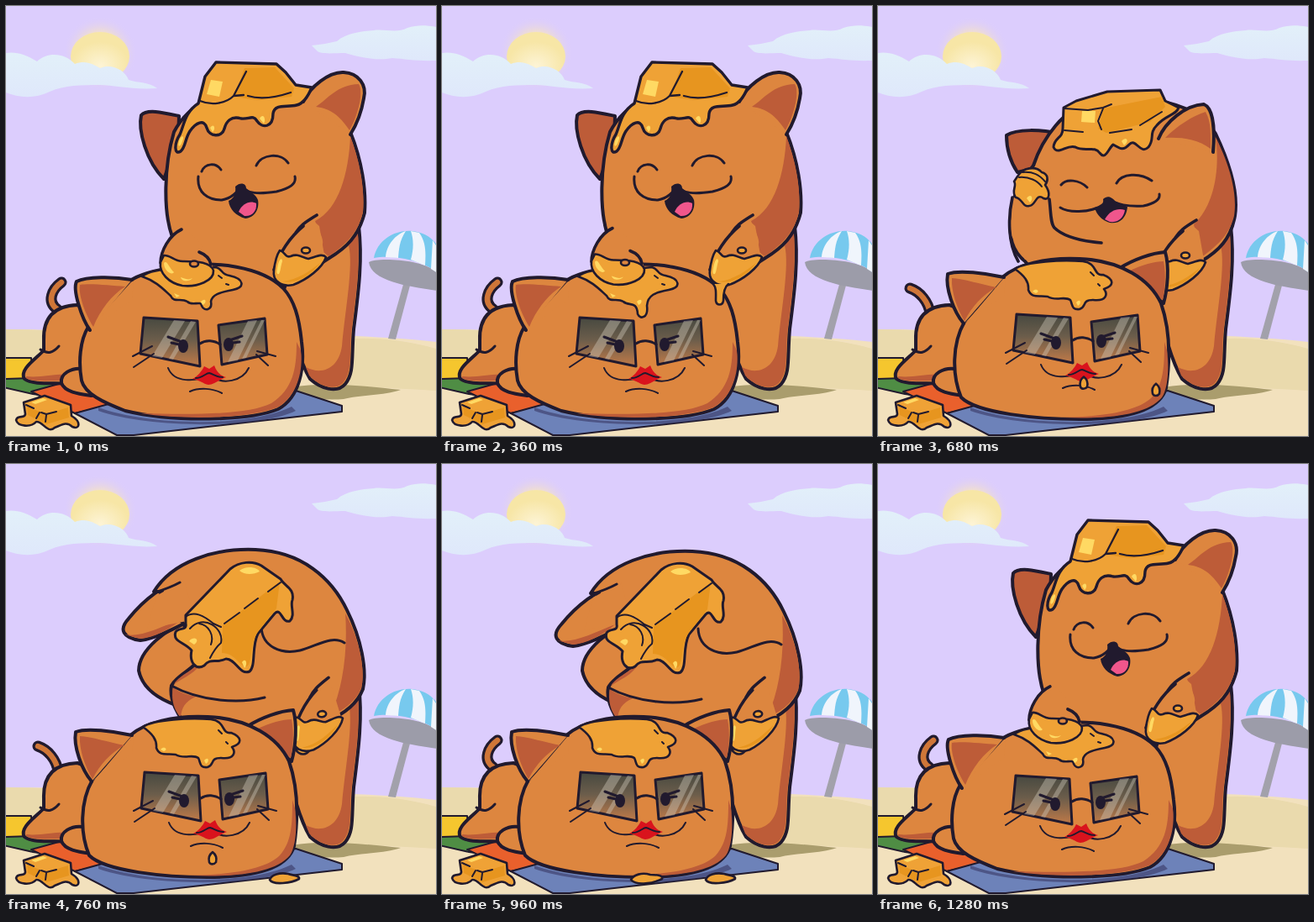
Write an HTML page that moves like this. It is 512 px wide and 512 px high and loops after 1.36 s.

```html
<!DOCTYPE html>
<html lang="en">
<head>
<meta charset="utf-8">
<title>Butter massage on the beach</title>
<style>
html, body { margin: 0; width: 100%; height: 100%; overflow: hidden }
svg { display: block; width: 100%; height: 100% }
path, ellipse { stroke-linejoin: round; stroke-linecap: round }
.fur { fill: #dd863f; stroke: #211a2e; stroke-width: 4 }
.patch { fill: #dd863f }
.shade { fill: #bd5c38 }
.ear { fill: #bd5c38; stroke: #211a2e; stroke-width: 4 }
.line { fill: none; stroke: #211a2e; stroke-width: 3 }
.thin { fill: none; stroke: #211a2e; stroke-width: 2 }
.butter { fill: #efa236; stroke: #211a2e; stroke-width: 2.6 }
.deep { fill: #e7951f }
.shine { fill: #ffd963 }
.dark { fill: #211a2e }
</style>
</head>
<body>
<svg viewBox="0 0 512 512">
  <defs>
    <radialGradient id="glow">
      <stop offset=".5" stop-color="#f6e3c4"/><stop offset="1" stop-color="#dccdfd" stop-opacity="0"/>
    </radialGradient>
    <radialGradient id="sun" cy=".7">
      <stop offset="0" stop-color="#fdf4d6"/><stop offset="1" stop-color="#f7e6a6"/>
    </radialGradient>
    <linearGradient id="lens" x2="0" y2="1">
      <stop offset="0" stop-color="#474940"/><stop offset=".45" stop-color="#6b5d4b"/><stop offset="1" stop-color="#c07a48"/>
    </linearGradient>
    <linearGradient id="cloud" x2="0" y2="1">
      <stop offset="0" stop-color="#e2f0f9"/><stop offset="1" stop-color="#dfe8fb"/>
    </linearGradient>
    <g id="hand">
      <path class="patch" d="M364 254C342 267 325 290 319 315L345 332L380 302L373 262Z"/>
      <path class="line" d="M370 249C355 258 350 262 345 270M354 262C338 275 325 295 319 314" style="stroke-width:3.6"/>
      <path class="butter" d="M326 291C333 293 332 300 339 298C348 294 353 300 360 301C368 299 377 294 381 299C377 312 358 326 342 332C328 335 317 327 319 315C320 306 322 297 326 291Z"/>
      <path class="shine" d="M323 312C325 300 329 299 329 304C327 310 327 316 325 319C322 320 322 316 323 312Z"/>
      <path class="deep" d="M329 328C348 326 362 315 374 306C364 320 345 332 329 328Z"/>
      <ellipse class="butter" cx="357" cy="291" rx="5" ry="3.5"/>
    </g>
  </defs>

  <rect width="512" height="512" fill="#dccdfd"/>
  <circle cx="112" cy="56" r="44" fill="url(#glow)"/>
  <ellipse cx="112" cy="60" rx="35" ry="29" fill="url(#sun)"/>
  <path fill="url(#cloud)" d="M0 56C12 54 24 58 37 66C50 54 70 56 82 69C96 64 104 70 112 74C125 68 142 76 146 88C158 92 170 90 180 98C150 100 128 94 112 94C90 94 70 94 52 102C34 111 14 109 0 103Z"/>
  <path fill="url(#cloud)" d="M364 47C376 46 384 44 394 42C405 32 424 30 438 29C450 27 466 33 478 26C490 22 502 23 512 25V65C490 66 476 63 460 62C440 66 418 60 404 56C390 56 374 58 370 53Z"/>

  <path fill="#f2e1bd" d="M0 385C40 386 380 385 512 400V512H0Z"/>
  <path fill="#eadaad" d="M0 385C40 385 70 388 100 390V420H0ZM380 400C420 392 470 396 512 408V458C470 456 420 452 380 453Z"/>
  <path fill="#a2a1ab" d="M474 328L482 329L464 397L455 396Z"/>
  <path fill="#9c9ca9" d="M432 305C440 299 500 301 513 318V339C480 334 435 328 432 305Z"/>
  <path fill="#77c9ee" d="M438 300C442 278 464 266 484 268C500 270 510 278 514 287V318C495 302 460 296 438 300Z"/>
  <path fill="#f0f5fc" d="M452 299C453 284 464 272 476 268C468 280 468 290 467 300ZM482 302C486 288 485 276 482 268L492 270C500 281 500 293 499 309ZM506 313L508 279L514 288V318Z"/>
  <path fill="#aa9d6d" d="M340 454C380 447 430 453 470 457C450 464 420 463 402 468C380 470 350 466 340 462Z"/>

  <g stroke="#211a2e" stroke-width="2">
    <path fill="#f5c62e" d="M-3 419L30 419L32 446L-3 444Z"/>
    <path fill="#4f8d44" d="M-3 444L62 442L48 464L32 462L-3 454Z"/>
    <path fill="#e9602c" d="M30 459L70 448L125 475L82 485Z"/>
    <path fill="#6d82b9" d="M82 485L122 474L345 458L400 476L400 483L152 511L132 511Z"/>
  </g>
  <path fill="#3d3e6c" opacity=".65" d="M110 478C170 500 290 502 340 477L345 482C300 504 170 503 110 482Z"/>

  <g id="tail" fill="none">
    <path stroke="#211a2e" stroke-width="13"/>
    <path stroke="#cf7638" stroke-width="6.5"/>
  </g>
  <path class="fur" d="M45 398C44 370 58 357 85 356L102 362L105 452L80 450C60 448 32 452 22 444C15 433 36 420 45 410Z"/>
  <path class="shade" d="M24 441C42 443 60 437 76 439L70 446C54 446 32 448 24 443Z"/>
  <path class="line" d="M41 409C50 415 56 413 63 405"/>
  <path class="fur" d="M92 432C78 430 64 438 66 449C70 460 88 462 102 464"/>

  <g>
    <path class="butter" d="M21 472L46 464L77 475L78 488C90 495 88 505 79 501C72 494 66 499 58 502C49 510 44 494 36 495C30 502 14 501 12 493C14 486 22 492 23 486Z"/>
    <path class="deep" d="M25 477L48 486L74 478L75 490L48 498L26 487Z"/>
    <path class="thin" d="M24 475L33 479M42 484L48 486L60 483M36 491L40 484M48 487L47 495"/>
    <path class="shine" d="M30 472L44 467L49 469L35 474Z"/>
  </g>

  <path class="fur" d="M344 300L420 262C425 305 419 345 414 385C411 420 415 436 404 450C394 462 374 455 362 444C350 424 340 390 330 340Z"/>
  <path class="shade" d="M419 270C422 310 416 350 411 390C409 420 412 436 401 449C390 459 372 452 361 440L357 430C376 440 396 432 400 405C404 360 414 310 408 285Z"/>

  <!-- laughing, both paws on the friend -->
  <g id="laugh">
    <path class="ear" d="M206 131C188 127 168 122 161 130C157 148 167 185 188 206L205 160Z"/>
    <path class="fur" d="M200 150C220 112 260 98 300 96C352 94 392 112 410 150C424 185 429 220 427 246C420 274 405 288 385 300L335 332L230 332L198 275C187 245 188 190 200 150Z"/>
    <path class="shade" d="M410 155C423 190 427 220 425 245C420 268 406 284 384 298L372 288C384 284 372 268 368 256C396 242 408 200 410 155Z"/>
    <path class="fur" d="M354 114C362 96 385 78 402 79C420 80 430 94 426 110C423 128 417 142 410 153"/>
    <path class="shade" d="M369 120C384 110 394 94 420 93C427 104 417 135 409 148C397 130 386 122 369 120Z"/>
    <path class="butter" style="stroke-width:3.4" d="M229 116L237 84L250 67L322 69L333 79L345 94L364 97C360 107 355 116 346 118C334 121 320 116 318 128C318 145 305 146 299 137C294 129 290 135 280 134C268 130 262 138 260 146C257 157 242 156 239 145C236 134 226 139 219 149C213 158 214 168 208 173C200 178 200 164 207 153C212 142 213 126 229 116Z"/>
    <path class="deep" d="M272 108L284 74L320 73L343 98L340 108L300 112Z"/>
    <path class="line" d="M231 113C245 119 262 116 271 107L283 106M271 107L286 78M288 107C304 112 324 108 339 103" style="stroke-width:2.3"/>
    <path class="shine" d="M244 88L258 90L254 108L239 105Z"/>
    <path class="shine" d="M206 161C209 153 213 154 210 161C208 168 204 169 206 161ZM243 145C248 138 250 147 246 150ZM302 134C306 127 310 134 307 140Z"/>
    <path class="line" d="M233 197C237 187 250 186 256 195M298 190C304 176 328 174 336 187M229 203C227 222 240 231 257 231C268 229 276 222 279 214C286 224 302 224 322 221C338 217 346 212 344 203"/>
    <path class="dark" d="M273 215C279 209 286 211 286 217C292 222 298 225 300 231C302 242 296 252 285 253C274 250 266 242 265 232C272 229 274 222 273 215Z"/>
    <path fill="#f0568c" d="M277 245C281 235 291 231 298 235C299 245 292 251 284 250Z"/>
    <use href="#hand"/>
  </g>

  <!-- bending over, back of the head showing -->
  <g id="bend">
    <path id="bendArm" class="fur" d="M225 184C190 195 158 222 158 246C162 266 180 279 202 287L250 260Z"/>
    <g id="bendEar">
      <path class="fur" d="M214 138C190 140 163 163 146 184C134 197 139 207 160 210C180 207 200 196 220 186Z"/>
      <path class="shade" d="M141 203C160 207 185 194 210 184C196 197 175 207 160 208Z"/>
    </g>
    <g id="back">
      <path class="fur" d="M176 152C198 116 248 100 297 102C352 104 388 136 406 174C423 208 430 245 425 268C418 286 402 298 382 306L340 332L222 322C203 298 194 280 197 264C204 250 225 244 232 230L210 188C192 176 176 166 186 152Z"/>
      <path class="shade" d="M404 178C422 210 428 248 423 267C416 284 400 294 386 300C402 265 407 220 404 178ZM199 266C206 272 216 275 226 277C213 283 209 290 208 302C200 293 196 280 199 266ZM200 262C206 252 222 246 232 236C228 248 212 254 200 262Z"/>
      <path class="patch" d="M179 157L212 138L225 185L200 190L168 196Z"/>
      <path class="line" d="M177 153C190 149 198 146 207 141M197 264C230 282 276 286 308 278M304 194C305 218 328 227 350 222C370 217 388 203 403 213"/>
    </g>
    <g id="slab">
      <path class="butter" style="stroke-width:3" d="M214 180L267 125C278 116 294 115 304 121L327 137C332 146 344 148 341 162C338 169 345 180 338 187C328 190 328 170 320 178L300 202C292 218 298 240 290 247C278 252 274 232 262 232C250 238 244 230 236 240C226 246 218 236 221 222C213 212 198 212 202 200C206 194 216 199 214 190Z"/>
      <path class="deep" d="M258 192L326 140L322 172L300 200C290 214 294 236 287 241C277 242 274 225 257 225Z"/>
      <path class="thin" d="M214 182C224 174 236 181 247 190L256 194M260 190L278 177M284 172L300 160M312 152L327 141M219 196C235 178 260 195 256 213C250 218 246 225 243 231M230 190C242 192 248 204 244 215"/>
      <path class="shine" d="M278 127C286 120 300 123 302 128C294 132 284 132 278 127ZM218 211C224 204 232 209 224 215ZM281 236C286 230 288 238 284 243Z"/>
    </g>
    <path class="butter" d="M344 339C350 348 358 347 362 340Z"/>
    <use href="#hand" transform="translate(23 11) rotate(-7 320 320)"/>
  </g>

  <!-- rising, one paw taking butter from the head -->
  <g id="reach">
    <path class="ear" d="M216 152C195 147 165 146 153 154C153 172 158 186 166 198L200 190Z"/>
    <path class="fur" d="M185 190C195 160 220 120 260 112C320 104 380 115 402 152C420 190 429 225 425 250C420 278 405 292 385 304L335 332L190 322L175 304C160 292 155 275 158 250C160 225 170 208 185 190Z"/>
    <path class="shade" d="M402 156C424 200 427 230 424 250C418 275 400 288 384 300L376 260C398 240 408 200 402 156Z"/>
    <path class="fur" d="M334 158C342 138 366 118 388 117C400 122 401 150 399 174"/>
    <path class="shade" d="M342 157C356 143 374 131 390 126C397 138 396 155 396 170C380 158 360 156 342 157Z"/>
    <path class="butter" style="stroke-width:3" d="M221 121L236 113L273 102L336 100L342 113L358 121C355 130 342 130 332 142C322 152 330 158 322 168C312 178 307 156 299 165C291 174 286 168 280 165C274 170 271 184 264 175C258 166 246 174 235 168C225 164 214 179 209 168C210 156 220 158 220 146Z"/>
    <path class="deep" d="M268 122L338 108L342 120L324 138L272 151L262 146Z"/>
    <path class="thin" d="M222 122L250 124L268 121L278 117M268 122L262 137L266 147M276 151L302 147M312 142L338 126M222 148L244 150"/>
    <path class="shine" d="M243 125L259 125L258 139L242 138ZM290 161C296 154 300 161 293 166Z"/>
    <path class="line" d="M218 213C224 205 240 207 249 216M284 211C290 199 312 198 326 208M217 240C228 247 250 245 262 240C268 237 272 234 275 229C282 237 300 239 316 238C330 235 336 230 335 224"/>
    <path class="dark" d="M268 230C274 224 280 229 283 233L297 239C296 252 288 260 276 258C266 255 260 248 258 240C266 238 269 235 268 230Z"/>
    <path fill="#f0568c" d="M270 254C276 243 286 240 294 243C292 254 284 258 276 257Z"/>
    <path class="patch" d="M160 228L204 228L207 262L240 290L175 302L157 270Z"/>
    <path class="line" style="stroke-width:3.6" d="M160 228C155 250 154 282 167 304M204 230C206 245 205 258 210 264C222 276 244 280 266 282"/>
    <path class="butter" d="M166 203C172 192 188 190 195 198C203 200 203 208 199 213C206 223 204 232 197 229C188 222 188 238 180 238C172 240 172 229 164 228C158 220 166 214 162 209Z"/>
    <path class="thin" d="M168 204C180 203 190 208 195 215M172 198C185 197 192 201 199 209"/>
    <path class="shine" d="M177 229C182 222 186 229 181 234Z"/>
    <use href="#hand" x="9" y="6"/>
  </g>

  <!-- the friend's head -->
  <g id="headPressed">
    <path class="fur" d="M98 382C88 398 86 424 90 446C94 462 116 472 142 482C200 496 290 494 324 480C350 466 356 430 352 400C349 370 343 350 330 336C305 311 250 302 200 311C176 315 158 320 148 327Z"/>
    <path class="shade" d="M351 410C354 432 348 464 323 478C292 490 220 494 160 485C230 487 290 486 316 473C342 456 346 432 346 400Z"/>
    <path class="fur" d="M150 326C128 322 96 322 84 328C79 338 90 372 100 386"/>
    <path class="patch" d="M102 384L152 328L150 350Z"/>
    <path class="shade" d="M88 332C102 330 124 333 142 334C126 344 112 362 104 382C95 368 86 345 88 332Z"/>
  </g>
  <g id="headFree">
    <path class="fur" d="M288 312C304 302 326 294 342 293C347 310 345 336 340 354Z"/>
    <path class="shade" d="M298 316C314 308 330 304 340 304C343 320 342 336 339 350Z"/>
    <path class="fur" d="M103 376C88 402 88 440 99 466C118 485 190 492 240 492C300 492 336 480 343 455C349 415 346 380 337 354C324 326 290 303 240 301C200 299 165 308 148 323Z"/>
    <path class="shade" d="M344 410C347 432 345 456 338 466C320 488 270 492 220 490C270 489 310 482 326 466C340 450 341 430 341 400Z"/>
    <path class="fur" d="M150 323C128 318 96 314 83 319C80 336 90 364 102 378"/>
    <path class="patch" d="M104 377L152 325L150 345Z"/>
    <path class="shade" d="M88 324C102 325 122 331 141 335C124 344 112 358 103 375C94 360 87 340 88 324Z"/>
    <path class="butter" d="M163 313C174 321 180 328 179 338C183 349 192 344 202 346C212 352 222 345 229 350C232 356 230 362 240 361C249 358 242 350 256 350C272 352 274 343 269 337C282 333 281 325 268 320C256 322 262 306 244 304C220 302 176 304 163 313Z"/>
    <path class="thin" d="M253 317L257 321M262 331L264 333"/>
    <path class="shine" d="M236 353C241 347 243 354 238 357ZM184 340C188 335 194 340 188 342Z"/>
  </g>
  <g id="face">
    <path fill="url(#lens)" stroke="#211a2e" stroke-width="3" d="M164 371L228 375L231 429L160 414ZM253 380L308 372L311 415L257 427Z"/>
    <path fill="#d3cbbb" opacity=".4" d="M200 374L213 375L186 419L174 417ZM220 375L226 376L199 421L194 420ZM288 375L299 374L276 422L264 424ZM304 374L308 374L286 419L281 420Z"/>
    <path class="thin" d="M231 402C238 397 248 398 255 403" style="stroke-width:3"/>
    <ellipse class="dark" cx="211" cy="405" rx="6" ry="8"/>
    <ellipse class="dark" cx="265" cy="403" rx="6" ry="8"/>
    <path class="line" d="M193 394L209 400M197 401L206 403M266 398L281 393M270 401L278 400"/>
    <path class="thin" d="M152 430L176 414M151 417L174 405M299 411L321 417M298 415L312 428M193 431C200 449 226 448 242 439C258 453 282 446 289 431"/>
    <path fill="#d9131d" d="M222 444C228 441 233 435 236 429L242 432L248 428C251 436 255 440 262 442C254 445 247 451 241 451C235 450 230 445 222 444Z"/>
    <path class="thin" d="M226 443C234 443 238 437 242 437C247 438 250 442 258 442M219 459C230 454 246 455 257 461"/>
  </g>

  <!-- butter under the rubbing paw -->
  <g id="rub">
    <path id="blob" class="butter"/>
    <path class="thin" d="M253 321L257 324M262 331L265 332"/>
    <path class="shine" d="M232 352C238 346 240 353 234 356ZM200 342L207 345L203 347Z"/>
    <g id="paw">
      <path class="patch" d="M198 273C188 283 184 296 184 310C190 330 218 338 236 328C248 322 250 310 240 300C236 286 222 268 208 264"/>
      <path class="line" d="M209 266C194 273 184 292 184 306M230 293C238 296 243 302 244 308" style="stroke-width:3.6"/>
      <path class="butter" d="M188 297C196 296 200 305 212 304C228 304 244 305 247 315C248 327 228 335 210 333C194 330 182 318 184 305Z"/>
      <path class="shine" d="M188 306C192 302 194 312 200 317C198 321 188 316 188 306ZM208 323C216 326 218 326 222 324C218 329 209 328 208 323Z"/>
      <ellipse class="butter" cx="224" cy="307" rx="5" ry="3.5" style="fill:#dd863f"/>
    </g>
    <path id="drip" class="butter"/>
  </g>

  <g id="drops">
    <path class="butter" d="M0 -7C4 -4 5 1 4 5C2 8 -3 8 -4 5C-5 1 -4 -4 0 -7Z"/>
    <path class="butter" d="M0 -7C4 -4 5 1 4 5C2 8 -3 8 -4 5C-5 1 -4 -4 0 -7Z"/>
  </g>
  <g id="puddles">
    <path class="butter" d="M225 495C228 489 238 486 248 489C256 489 264 490 262 494C252 499 232 503 225 495Z"/>
    <path class="butter" d="M314 495C316 489 326 486 336 488C342 490 350 490 349 494C340 499 318 502 314 495Z"/>
  </g>
</svg>
<script>
const LOOP = 1360, SWING = LOOP / 3;
const byId = id => document.getElementById(id);
const show = (el, on) => el.style.display = on ? '' : 'none';
const move = (el, x, y) => el.setAttribute('transform', `translate(${x} ${y})`);
const clamp = (v, lo = 0, hi = 1) => Math.min(hi, Math.max(lo, v));
const [leftDrop, rightDrop] = byId('drops').children;
const [leftPuddle, rightPuddle] = byId('puddles').children;

function drawPose(t) {
  const laughing = t < 640 || t >= 1200;
  const bending = t >= 700 && t < 1060;
  show(byId('laugh'), laughing);
  show(byId('rub'), laughing);
  show(byId('headPressed'), laughing);
  show(byId('headFree'), !laughing);
  show(byId('bend'), bending);
  show(byId('reach'), !laughing && !bending);
  move(byId('face'), laughing ? 0 : 1, laughing ? 0 : -4);
  const scoop = clamp((t - 760) / 200);
  move(byId('back'), scoop, 2 * scoop);
  move(byId('slab'), -6 * scoop, scoop);
  move(byId('bendEar'), -4 * scoop, 7 * scoop);
  move(byId('bendArm'), 9 * scoop, 0);
}

function drawTail(t) {
  const curled = (t + 100) % SWING < SWING / 2;
  const d = curled ? 'M61 361C48 352 55 337 66 329' : 'M62 366C60 352 50 340 38 336';
  for (const path of byId('tail').children) path.setAttribute('d', d);
}

function drawRub(t) {
  const side = clamp(.5 - 1.3 * Math.cos((t - 35) / SWING * 2 * Math.PI));
  move(byId('paw'), -8 * side, -2 * side);
  const sag = t < 640 ? 14 * clamp(t / 520) : 0;
  byId('blob').setAttribute('d', `M162 322C174 313 196 312 220 314L250 311C258 313 256 320 266 321C284 325 285 335 270 338C254 341 245 344 244 ${352 + sag / 2}C246 ${362 + sag} 236 ${364 + sag} 233 ${357 + sag}C232 350 222 358 216 352C208 347 200 354 196 345C189 339 180 328 162 322Z`);
  const tip = 338 + 18 * clamp((t - 60) / 120);
  show(byId('drip'), t >= 80 && t < 640);
  byId('drip').setAttribute('d', `M323 331C327 336 326 342 326 ${tip - 5}C327 ${tip + 1} 334 ${tip + 1} 335 ${tip - 5}C335 340 337 334 341 331`);
}

function drawDrops(t) {
  const fall = t - 400;
  move(leftDrop, 243 + 3 * clamp((t - 520) / 240), 376 + .258 * fall);
  move(rightDrop, 331, 356 + .26 * fall + .00035 * fall * fall);
  show(leftDrop, fall >= 0 && t < 840);
  show(rightDrop, fall >= 0 && t < 720);
  show(leftPuddle, t >= 840 && t < 1200);
  show(rightPuddle, t >= 720 && t < 1200);
}

const start = performance.now();
function frame() {
  const t = (performance.now() - start) % LOOP;
  drawPose(t);
  drawTail(t);
  drawRub(t);
  drawDrops(t);
  requestAnimationFrame(frame);
}
frame();
</script>
</body>
</html>
```
